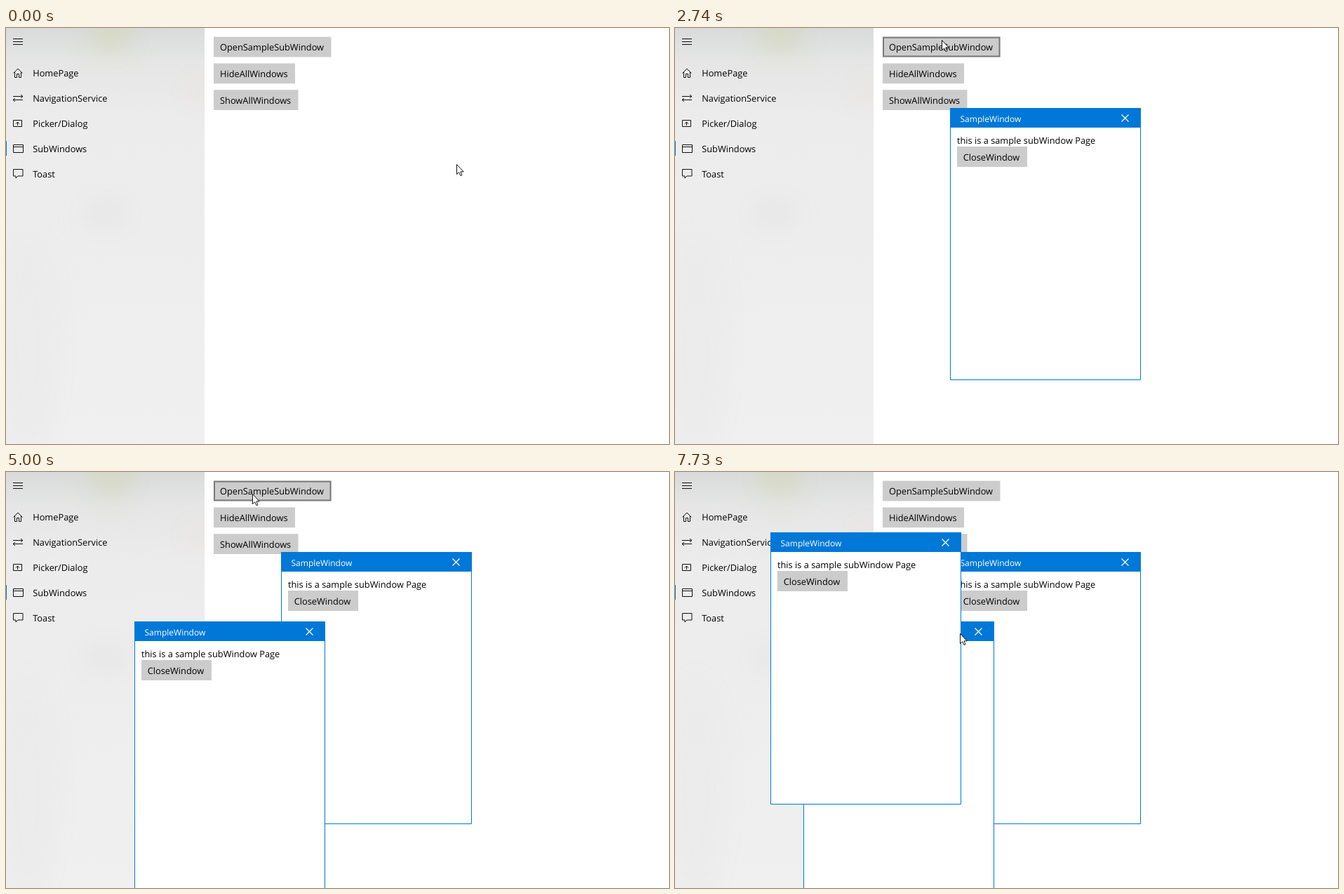
Animation, 945 px wide and 593 px high, one loop 8 s. Source, as an HTML page:

```html
<!DOCTYPE html>
<html lang="en">
<head>
<meta charset="utf-8">
<title>Sub windows</title>
<style>
  html, body { margin: 0; width: 100%; height: 100%; overflow: hidden; background: #fff; }
  svg { display: block; width: 945px; height: 593px; }
  text { font: 12.8px "Open Sans", "Noto Sans", sans-serif; text-rendering: geometricPrecision; white-space: pre; }
  .title { font-size: 12px; fill: #fff; }
  .icon { fill: none; stroke: #111; }
  .button { fill: #ccc; }
  .blob { filter: url(#blur); }
</style>
</head>
<body>
<svg viewBox="0 0 945 593">
  <defs>
    <linearGradient id="acrylic" x2="0" y2="1">
      <stop stop-color="#d9dbdb"/>
      <stop offset=".08" stop-color="#e5e6e5"/>
      <stop offset=".22" stop-color="#ececec"/>
      <stop offset="1" stop-color="#f0f0f0"/>
    </linearGradient>
    <linearGradient id="fade">
      <stop stop-color="#a89c9c" stop-opacity="0"/>
      <stop offset="1" stop-color="#a89c9c"/>
    </linearGradient>
    <filter id="blur" x="-1" y="-1" width="3" height="3"><feGaussianBlur stdDeviation="16"/></filter>
    <clipPath id="pane"><path d="M0 0H283V593H0Z"/></clipPath>
    <g id="window">
      <path d="M.5 .5H271.5V387.5H.5Z" fill="#fff" stroke="#0078d7"/>
      <path d="M0 0H272V28H0Z" fill="#0078d7"/>
      <text class="title" x="14.5" y="19.7">SampleWindow</text>
      <path d="M244.5 9.5l10 10m0-10l-10 10" stroke="#fff" stroke-width="1.2"/>
      <text x="10" y="51">this is a sample subWindow Page</text>
      <path class="button" d="M10 55H110V84H10Z"/>
      <text x="18.7" y="74.5">CloseWindow</text>
    </g>
  </defs>

  <g clip-path="url(#pane)">
    <path d="M0 0H283V593H0Z" fill="url(#acrylic)"/>
    <g class="blob">
      <ellipse cx="150" cy="10" rx="34" ry="26" fill="#cfd2a6" opacity=".4"/>
      <ellipse cx="275" cy="92" rx="20" ry="20" fill="#eedfdf" opacity=".45"/>
      <ellipse cx="142" cy="265" rx="32" ry="20" fill="#e2e2e2" opacity=".55"/>
      <ellipse cx="30" cy="450" rx="45" ry="160" fill="#e9e9e9" opacity=".6"/>
    </g>
    <path id="streak" d="M218 81H283V82H218Z" fill="url(#fade)"/>
  </g>
  <path d="M0 161H1V182H0Z" fill="#0078d7"/>
  <path class="icon" d="M10 15.5h14m-14 4h14m-14 4h14
    M10.5 64.5L17 58l6.5 6.5M12.5 63v7.5h3v-5h3v5h3V63
    M10 97.5h14m-3-2.5l3 2.5-3 2.5M24 102.5H10m3-2.5l-3 2.5 3 2.5
    M10.5 131.5h12v9h-12zM16.5 139v-5m-2.5 2.5l2.5-2.5 2.5 2.5
    M10.5 166.5h14v11h-14zm0 3h14
    M10.5 201.5h13.5v9.5h-7l-3 3v-3h-3.5z"/>
  <g id="nav"></g>
  <g id="buttons"></g>
  <g id="windows"></g>
  <path id="pointer" d="M.5 .5V14.6L3.7 11.7 6 16.6 8 15.7 5.9 10.9H10.2Z" fill="#fff" stroke="#111"/>
  <circle id="press" r="11" fill="#ff0" opacity=".5"/>
</svg>
<script>
const LOOP = 8000, FADE = 100, CLICK = 150, REST = 240;
const HOME = [85, 89], SIZE = [272, 388], BUTTON_H = 28.8;
const $ = id => document.getElementById(id);
const add = (parent, html) => {
  parent.insertAdjacentHTML('beforeend', html);
  return parent.lastElementChild;
};

['HomePage', 'NavigationService', 'Picker/Dialog', 'SubWindows', 'Toast'].forEach((label, i) =>
  add($('nav'), `<text x="38.2" y="${69 + 36 * i}">${label}</text>`));

const buttons = Object.entries({ OpenSampleSubWindow: 167.5, HideAllWindows: 116, ShowAllWindows: 120.5 })
  .map(([label, w], i) => {
    const y = 12.6 + 37.8 * i;
    const g = add($('buttons'), `<g>
      <rect class="button" x="296" y="${y}" width="${w}" height="${BUTTON_H}"/>
      <rect x="297" y="${y + 1}" width="${w - 2}" height="${BUTTON_H - 2}" fill="none" stroke="#7a7a7a" stroke-width="2"/>
      <text x="305" y="${32 + 38 * i}">${label}</text></g>`);
    return { y, w, face: g.children[0], rim: g.children[1] };
  });

// Each session clicks the open button, then drags the new window by its title bar.
// Keys are [time, x, y]; grab is the pointer's place within the window.
const sessions = [
  { click: [780, 380, 28], grab: [184, 25], drag: [[1700, ...HOME], [1965, 105, 98], [2250, 392, 114]] },
  { click: [2800, 380, 17], grab: [192, 12], drag: [[3830, ...HOME], [4300, 183, 213]] },
  { click: [5230, 351, 31], grab: [204, 8], drag: [[6260, ...HOME], [6500, 136, 86]] },
];

const route = [[70, 642, 194]];
for (const s of sessions) {
  const [t, x, y] = s.click;
  const held = s.drag.map(([t, x, y]) => [t, x + s.grab[0], y + s.grab[1]]);
  const [first, ...from] = held[0], [last, ...to] = held.at(-1);
  route.push([t - REST, x, y], [t + REST, x, y], [first - 80, ...from], ...held, [last + 120, ...to]);
  s.open = t + REST;
  s.presses = [[t, t + CLICK], [first, last + 50]];
  s.el = add($('windows'), '<use href="#window"/>');
}
route.push([7040, 428, 290], [7730, 406, 230]);

const show = (el, on) => el.setAttribute('visibility', on ? 'visible' : 'hidden');
const place = (el, x, y) => el.setAttribute('transform', `translate(${x} ${y})`);
const inside = (x, y, left, top, w, h) => x >= left && x < left + w && y >= top && y < top + h;

function at(track, t) {
  const i = track.findIndex(key => key[0] > t);
  if (i < 1) return track.at(i).slice(1);
  const [t0, x0, y0] = track[i - 1], [t1, x1, y1] = track[i];
  const u = (t - t0) / (t1 - t0), k = u * u * (3 - 2 * u);
  return [x0 + (x1 - x0) * k, y0 + (y1 - y0) * k].map(Math.round);
}

function draw(t) {
  const [px, py] = at(route, t);
  const pressed = sessions.some(s => s.presses.some(([a, b]) => t >= a && t < b));
  let covered = false, nearEdge = false;

  for (const { open, drag, el } of sessions) {
    const age = t - open, [x, y] = at(drag, t);
    show(el, age >= 0);
    el.setAttribute('opacity', Math.min(1, Math.max(0, age / FADE)));
    place(el, x, y);
    covered ||= age >= 0 && inside(px, py, x, y, ...SIZE);
    nearEdge ||= age > 400 && x < 120;
  }
  for (const { y, w, face, rim } of buttons) {
    const hover = !covered && inside(px, py, 296, y, w, BUTTON_H);
    show(rim, hover && !pressed);
    face.style.fill = hover && pressed ? '#999' : '';
  }
  place($('pointer'), px, py);
  place($('press'), px, py);
  show($('press'), pressed);
  show($('streak'), nearEdge);
}

const start = performance.now();
function tick() {
  draw((performance.now() - start) % LOOP);
  requestAnimationFrame(tick);
}
tick();
</script>
</body>
</html>
```
